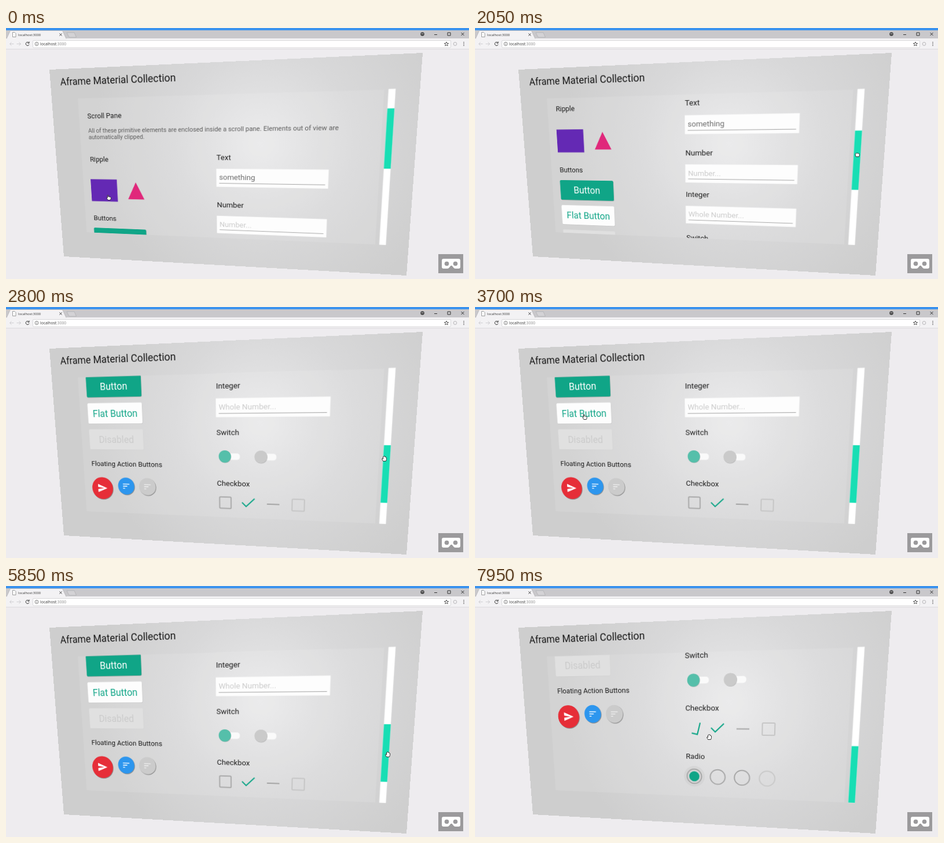
An HTML page for the animation above (8000 ms loop, 800 by 434 pixels).

```html
<!DOCTYPE html>
<html lang="en">
<head>
<meta charset="utf-8">
<title>Material Collection</title>
<style>
  html, body { margin: 0; width: 100%; height: 100%; overflow: hidden; background: #eeecef; }
  svg { position: absolute; left: 0; top: 0; font-family: Roboto, sans-serif; }
  /* Perspective of the tilted panel: 640 x 360 local units. */
  #panel {
    transform-origin: 0 0;
    transform: matrix3d(.81878, -.0566, 0, -.00026255, .09211, .98673, 0, .00022661, 0, 0, 1, 0, 75, 72, 0, 1);
  }
  .label { font-size: 13.6px; fill: #1c1c1c; }
  .note { font-size: 11.36px; fill: #5c5c5c; }
  .field { font-size: 13.6px; }
  .button { font-size: 18.2px; text-anchor: middle; }
  .address { font-family: 'Open Sans', sans-serif; fill: #333; }
</style>
</head>
<body>
<svg id="panel" width="640" height="360">
  <defs>
    <radialGradient id="light" gradientUnits="userSpaceOnUse" cx="392" cy="138" r="310">
      <stop offset="0" stop-color="#e9e9ea"/>
      <stop offset=".5" stop-color="#d8d8d9"/>
      <stop offset="1" stop-color="#cecece"/>
    </radialGradient>
    <clipPath id="pane"><rect x="53.5" y="53.5" width="533.5" height="254.5"/></clipPath>
  </defs>
  <rect width="640" height="360" fill="url(#light)"/>
  <text x="20.3" y="28.8" font-size="18.8" fill="#161616">Aframe Material Collection</text>
  <rect x="53.5" y="53.5" width="533.5" height="254.5" fill="#fff" opacity=".1"/>
  <rect x="593.6" y="52.6" width="10.6" height="255.6" fill="#fff"/>
  <rect id="thumb" x="593.6" width="10.6" height="96.5" fill="#18deb4"/>
  <g clip-path="url(#pane)"><g id="content"></g></g>
</svg>

<svg width="800" height="434" viewBox="0 0 800 434">
  <rect width="800" height="18" fill="#c9c8cb"/>
  <rect width="800" height="4" fill="#3b93ee"/>
  <rect y="18" width="800" height="19" fill="#f3f2f4"/>
  <path d="M0 36.5H800" stroke="#dcdbde"/>
  <path d="M1 18.5L7 5.5Q7.5 4.5 9 4.5H96Q97.5 4.5 98 5.5L104 18.5" fill="#f3f2f4" stroke="#a9a8ab" stroke-width=".6"/>
  <path d="M105 8H118L121.5 16H109Z" fill="#d3d2d5" stroke="#a9a8ab" stroke-width=".6"/>
  <path d="M11.5 7.5H15L17 9.5V15.5H11.5Z" fill="#fff" stroke="#777" stroke-width=".7"/>
  <text class="address" x="21" y="13.8" font-size="5.8">localhost:3000</text>
  <rect x="46.5" y="21.5" width="722" height="12.5" rx="1.5" fill="#fff" stroke="#cbcacd" stroke-width=".7"/>
  <text class="address" x="59" y="29.8" font-size="6.7">localhost<tspan fill="#888">:3000</tspan></text>
  <g fill="none" stroke="#333" stroke-width="1">
    <path d="M92.5 9.5l4 4m0-4l-4 4"/>
    <path d="M9.5 24.5l-3 3 3 3M6.5 27.5h7M22.5 24.5l3 3-3 3M25.5 27.5h-7" stroke="#cfced1"/>
    <path d="M39.5 25.5A3 3 0 1 0 40 28.5M40 23.5v2.7h-2.7"/>
    <circle cx="53" cy="27.5" r="3" stroke="#666" stroke-width=".8"/>
    <path d="M53 27v2.2M53 25.4v.8" stroke="#666" stroke-width=".8"/>
    <path d="M740 11.5h5M763 8h5v5h-5zM786.5 8l5 5m0-5l-5 5"/>
    <path d="M761 24l1 2.4 2.6.2-2 1.7.7 2.5-2.3-1.4-2.3 1.4.7-2.5-2-1.7 2.6-.2z" stroke-width=".8"/>
    <circle cx="776" cy="27.5" r="2.8" stroke="#b5b4b7"/>
  </g>
  <circle cx="719.5" cy="10.5" r="3.3" fill="#444"/>
  <path d="M717.5 10h4" stroke="#c9c8cb"/>
  <g fill="#444"><circle cx="791" cy="24.7" r=".8"/><circle cx="791" cy="27.5" r=".8"/><circle cx="791" cy="30.3" r=".8"/></g>

  <rect x="747" y="391" width="43" height="33" fill="#9b9a9c"/>
  <path d="M756 399H782Q785 399 785 402V413Q785 416 782 416H776.5Q774 416 773 414L771 411.5Q769.5 410 768 411.5L766 414Q765 416 762.5 416H756Q753 416 753 413V402Q753 399 756 399Z" fill="#fff"/>
  <g fill="#9b9a9c"><circle cx="761.5" cy="407.5" r="3.8"/><circle cx="776.5" cy="407.5" r="3.8"/></g>
  <path id="cursor" fill="#fff" stroke="#222" stroke-width=".9" stroke-linejoin="round"/>
</svg>

<script>
const TEAL = '#10a587';
const byId = id => document.getElementById(id);

// Markup helpers; y of a text is the middle of its capitals.
const text = (kind, x, y, size, string, fill) =>
  `<text class="${kind}" x="${x}" y="${y + size * .355}"${fill ? ` fill="${fill}"` : ''}>${string}</text>`;
const label = (x, y, string) => text('label', x, y, 13.6, string);
const rect = (x, y, w, h, fill, extra = '') =>
  `<rect x="${x}" y="${y}" width="${w}" height="${h}" fill="${fill}" ${extra}/>`;
const circle = (x, y, r, fill, extra = '') =>
  `<circle cx="${x}" cy="${y}" r="${r}" fill="${fill}" ${extra}/>`;
const line = (d, stroke, width, extra = '') =>
  `<path d="${d}" fill="none" stroke="${stroke}" stroke-width="${width}" ${extra}/>`;

const field = (y, string, color) =>
  rect(313.5, y, 193, 32.3, '#fdfdfd') + text('field', 318.4, y + 15, 13.6, string, color) +
  line(`M318.5 ${y + 25.9}H501.5`, '#a4a4a4', 1);
const button = (y, string, fill, color, shadow = .12) =>
  rect(70, y + .8, 107.3, 37.8, '#000', `rx="2.5" opacity="${shadow}"`) +
  rect(69.5, y, 107.3, 37.8, fill, 'rx="2.5"') + text('button', 123.5, y + 18.8, 18.2, string, color);
const floating = (x, y, r, fill, icon, id = '') =>
  `<g id="${id}" transform="translate(${x} ${y})">` + circle(.8, .9, r, '#000', 'opacity=".35"') +
  circle(0, 0, r - .2, fill) + icon + '</g>';
const toggle = (x, fill) =>
  rect(x, 437.2, 27, 11.5, '#fafafa', 'rx="5"') + circle(x + .5, 443.3, 11.1, '#000', 'opacity=".25"') +
  circle(x, 442.9, 11, fill);
const CHECK_ROW = 527;
const box = (x, stroke, id = '') =>
  rect(x - 10.5, CHECK_ROW - 10.5, 21, 21, 'none', `id="${id}" rx="1.5" stroke="${stroke}" stroke-width="2"`);
const tick = extra => line('M-11 -1.5L-3.7 5.8L11.5 -9', TEAL, 2.2, extra);
const ring = (x, stroke) => circle(x, 613.5, 13.3, 'none', `stroke="${stroke}" stroke-width="2"`);
const sortIcon = color => line('M-6.5 -4h13M-6.5 0h8.5M-6.5 4h4', color, 1.4);

byId('content').innerHTML = [
  label(70.5, 85.5, 'Scroll Pane'),
  text('note', 70.5, 111.7, 11.36, 'All of these primitive elements are enclosed inside a scroll pane. Elements out of view are'),
  text('note', 70.5, 123.6, 11.36, 'automatically clipped.'),

  label(70.5, 165.5, 'Ripple'),
  rect(69, 203.3, 53.5, 42.3, '#6429b4'),
  circle(160, 226, 31, '#bdbdbd', 'id="ripple"'),
  '<path d="M160 208.3L176 240.3H143.7Z" fill="#e0287b"/>',

  label(70.5, 278.3, 'Buttons'),
  button(298, 'Button', TEAL, '#fff', .25),
  button(346.4, 'Flat Button', '#fdfdfd', TEAL),
  button(394.6, 'Disabled', '#e0e0e0', '#cbcbcb', .03),

  label(70.2, 459, 'Floating Action Buttons'),
  floating(90.2, 506.8, 21.6, '#e62e38', '<path d="M-9 -8L10 0L-9 8V2L4 0L-9 -2Z" fill="#fff"/>', 'send'),
  floating(138.8, 501.7, 16.6, '#2d96ee', sortIcon('#fff')),
  floating(181.2, 501.7, 16.6, '#cbcbcb', sortIcon('#eee')),

  label(314, 160.7, 'Text'),
  field(181.5, 'something', '#6c6c6c'),
  label(314, 245.9, 'Number'),
  field(266.8, 'Number...', '#cbcbcb'),
  label(314, 320.5, 'Integer'),
  field(341.5, 'Whole Number...', '#cbcbcb'),

  label(314, 400.2, 'Switch'),
  toggle(328.7, '#55bfaa'),
  toggle(392.5, '#cacaca'),

  label(314, 491, 'Checkbox'),
  box(329.2, '#a6a6a6', 'emptyBox'),
  tick('id="newTick"'),
  tick(`transform="translate(370.6 ${CHECK_ROW})"`),
  line(`M404 ${CHECK_ROW}h22`, '#a6a6a6', 2.2),
  box(458.5, '#c6c6c6'),

  label(314, 577, 'Radio'),
  circle(329.2, 613.5, 19, '#bdbdbd', 'id="halo"'),
  ring(329.2, '#a6a6a6'),
  circle(329.2, 613.5, 9.3, TEAL, 'id="dot"'),
  ring(371.5, '#a6a6a6'), ring(414.5, '#a6a6a6'), ring(458, '#c9c9c9'),
].join('');

const HANDS = {
  open: 'M-2.5 4.5L-4.3 1.2Q-4.6 -.2 -3.3 .1L-2.5 1V-3Q-1.8 -4 -1.1 -3V-3.8Q-.4 -4.9 .4 -3.8V-3.3Q1.2 -4 1.9 -3.1V-2Q2.9 -2.6 3.5 -1.6V1.5L2.5 4.5Z',
  closed: 'M-2.4 3.5L-3.5 1V-1.5Q-2.5 -3 -1.2 -2.4Q.2 -3.4 1.4 -2.3Q3.2 -2.4 3.5 -.8V1.2L2.6 3.5Z',
  pointer: 'M-2 4.5L-4 1.2Q-4.1 0 -2.7 .6V-3.8Q-2 -4.9 -1.2 -3.8V-1.2Q-.3 -1.9 .4 -1Q1.3 -1.6 1.9 -.6Q3 -.9 3.3 .2V2L2.3 4.5Z',
};

const SCROLL = [[1750, 0], [2470, 246], [6000, 246], [6650, 342.5]];
const CURSOR = [
  [0, 178, 293], [400, 179, 293], [700, 227, 285], [1000, 229, 284], [1330, 690, 188], [1400, 688, 187],
  [1700, 663, 182], [1750, 663, 182], [2470, 657, 280], [2650, 657, 280], [2800, 654, 262],
  [3200, 190, 145], [3450, 190, 145], [3700, 190, 190], [3950, 190, 190], [4300, 174, 311],
  [5130, 177, 311], [5700, 660, 291], [6000, 660, 291], [6650, 655, 327], [6900, 655, 327],
  [7450, 381, 330], [7680, 382, 330], [7840, 386, 256], [7880, 388, 256], [7950, 405, 261],
];

const progress = (t, from, to) => Math.min(1, Math.max(0, (t - from) / (to - from)));
const during = (t, from, to) => t >= from && t < to;

function sample(keys, t) {
  const next = keys.findIndex(key => key[0] > t);
  if (next === 0) return keys[0].slice(1);
  if (next < 0) return keys[keys.length - 1].slice(1);
  const a = keys[next - 1], b = keys[next];
  const p = progress(t, a[0], b[0]), eased = p * p * (3 - 2 * p);
  return a.slice(1).map((v, i) => v + (b[i + 1] - v) * eased);
}

function draw(t) {
  const [scroll] = sample(SCROLL, t);
  byId('content').setAttribute('transform', `translate(0 ${-scroll})`);
  byId('thumb').setAttribute('y', 82.7 + .3757 * scroll);

  byId('ripple').setAttribute('r', 31 * progress(t, 700, 950));
  byId('ripple').setAttribute('opacity', .22 * (1 - progress(t, 1400, 1650)));

  const hover = progress(t, 4200, 4350) * (1 - progress(t, 5130, 5280));
  byId('send').setAttribute('transform', `translate(90.2 506.8) scale(${1 + .03 * hover})`);

  byId('halo').setAttribute('opacity', .25 * progress(t, 7400, 7500));
  byId('dot').setAttribute('r', 9.3 * progress(t, 7580, 7780));

  const checked = t >= 7870, turn = 1 - progress(t, 7870, 8150);
  byId('emptyBox').setAttribute('opacity', checked ? 0 : 1);
  byId('newTick').setAttribute('opacity', checked ? 1 : 0);
  byId('newTick').setAttribute('transform',
    `translate(${329.2 + 8.4 * turn} ${CHECK_ROW + 5 * turn}) rotate(${-45 * turn})`);

  const dragging = during(t, 1750, 2550) || during(t, 6000, 6700);
  const pointing = t < 1050 || during(t, 3150, 5180) || during(t, 7400, 7900);
  byId('cursor').setAttribute('d', HANDS[dragging ? 'closed' : pointing ? 'pointer' : 'open']);
  byId('cursor').setAttribute('transform', `translate(${sample(CURSOR, t)})`);
}

function frame() {
  draw(performance.now() % 8000);
  requestAnimationFrame(frame);
}
frame();
</script>
</body>
</html>
```
